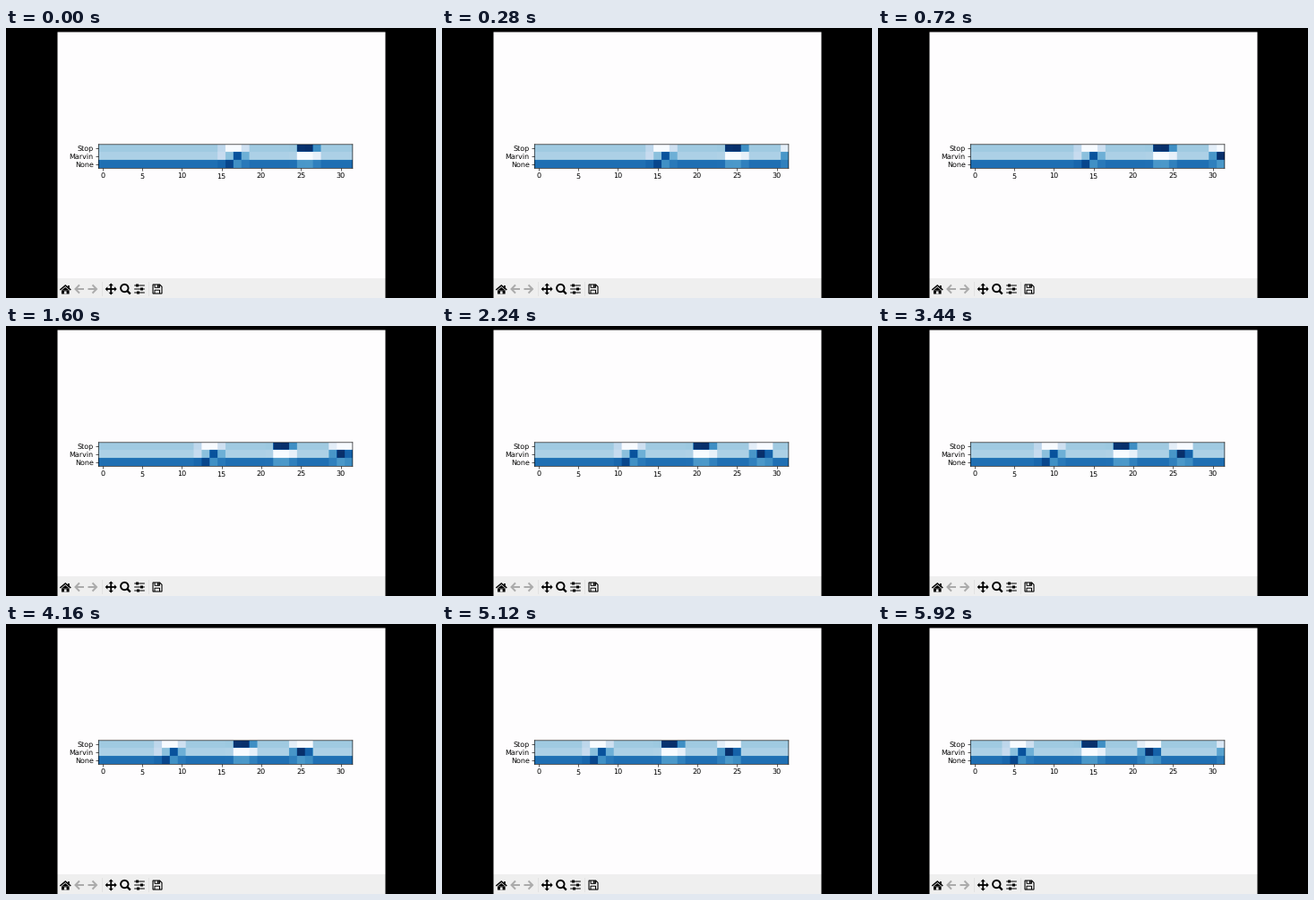
Animation of 480 by 301 pixels, one loop 6000 ms. Source, as a matplotlib script:

```python
import numpy as np
import matplotlib.pyplot as plt
from matplotlib.animation import FuncAnimation
from matplotlib.patches import Circle, Polygon, Rectangle

# Unsnapped shapes and unhinted text look like a scaled-down window
plt.rcParams.update({"path.snap": False, "text.hinting": "none"})

W, H, DPI = 480, 301, 100
STEP, LOOP = 40, 6000
COLS, LABELS = 32, ["Stop", "Marvin", "None"]
STOP, MARVIN, NONE = range(3)

# Scrolling: a steady beat with one stall (ms)
START, BEAT = 200, 500
STALL, STALL_AFTER = 460, 7


def scroll(t):
    """Cells scrolled by time t."""
    before = min((t - START) // BEAT + 1, STALL_AFTER)
    after = (t - START - STALL) // BEAT + 1
    return max(0, before, after)


def hear(scores, word, centre, width, gain=1):
    """Raise the score of one word around a column and damp the others."""
    cols = np.arange(scores.shape[1])
    pulse = gain * np.exp(-((cols - centre) / width) ** 6)
    for row, damping in enumerate((1.8, 1.8, 0.21)):
        if row == word:
            scores[row] += (1 - scores[row]) * pulse
        else:
            scores[row] *= 1 - np.minimum(1, damping * pulse)


stream = np.outer([0.37, 0.33, 0.755], np.ones(COLS + scroll(LOOP)))
hear(stream, NONE, 15.95, 0.85)
hear(stream, MARVIN, 16.95, 1.02, 0.81)
hear(stream, STOP, 25.7, 1.33)
hear(stream, MARVIN, 33.08, 1.1)
hear(stream, MARVIN, 43.12, 1.1)

# Window: a 640 x 480 canvas above a toolbar
X0, Y0, WIDTH = 57.5, 4.5, 366
SCALE = WIDTH / 640
HEIGHT = 480 * SCALE
BAR_TOP, BAR_Y, BAR = Y0 + HEIGHT, 291, "#efefef"

fig = plt.figure(figsize=(W / DPI, H / DPI), dpi=DPI, facecolor="black")
stage = fig.add_axes([0, 0, 1, 1])
stage.set(xlim=(0, W), ylim=(H, 0))
stage.axis("off")


def box(x, y, w, h, color="black"):
    stage.add_patch(Rectangle((x, y), w, h, fc=color, lw=0))


def line(points, width, color="black"):
    x, y = zip(*points)
    stage.plot(x, y, color=color, lw=width * 72 / DPI,
               solid_capstyle="butt", solid_joinstyle="miter")


def home(x, y):
    line([(x - 6, y + 1), (x, y - 4), (x + 6, y + 1)], 1.5)
    box(x + 2.8, y - 4, 1.7, 3.5)
    stage.add_patch(Polygon([(x - 4.3, y + 1.5), (x, y - 2), (x + 4.3, y + 1.5)],
                            fc="black", lw=0))
    box(x - 4.3, y + 1.5, 8.6, 4)
    box(x - 1.3, y + 2.4, 2.6, 3.1, BAR)


def arrow(x, y, d):
    grey = "#ababab"
    line([(x - d * 5, y), (x + d * 4, y)], 2, grey)
    line([(x, y - 4.6), (x + d * 4.5, y), (x, y + 4.6)], 2, grey)


def move(x, y):
    for dx, dy in [(1, 0), (-1, 0), (0, 1), (0, -1)]:
        line([(x, y), (x + 5 * dx, y + 5 * dy)], 1.8)
        bx, by = x + 3.8 * dx, y + 3.8 * dy
        head = [(x + 6.5 * dx, y + 6.5 * dy),
                (bx + 2.7 * dy, by + 2.7 * dx),
                (bx - 2.7 * dy, by - 2.7 * dx)]
        stage.add_patch(Polygon(head, fc="black", lw=0))


def zoom(x, y):
    stage.add_patch(Circle((x - 1, y - 1), 4.2, fill=False, lw=1.35))
    line([(x + 2, y + 2), (x + 5.5, y + 5.5)], 2.3)


def sliders(x, y):
    for dy, knob in [(-4, -2.5), (0, 2.5), (4, -1.5)]:
        line([(x - 5.8, y + dy), (x + 5.8, y + dy)], 1)
        box(x + knob - 1.5, y + dy - 1.5, 3, 3)


def save(x, y):
    line([(x - 5, y), (x - 5, y - 5), (x + 2.6, y - 5), (x + 5, y - 2.6),
          (x + 5, y + 5), (x - 5, y + 5), (x - 5, y)], 1.1)
    for edge, inner in [(-5, -1.7), (5, 1.2)]:
        line([(x - 3, y + edge), (x - 3, y + inner),
              (x + 2.5, y + inner), (x + 2.5, y + edge)], 1)
    box(x, y - 5, 1.6, 3)


box(X0, Y0, WIDTH, HEIGHT, "#fefdfe")
box(X0, BAR_TOP, WIDTH, H - BAR_TOP, BAR)
home(66.3, BAR_Y)
arrow(82, BAR_Y, -1)
arrow(96.5, BAR_Y, 1)
move(117.2, BAR_Y)
zoom(133.3, BAR_Y)
sliders(149, BAR_Y)
save(169, BAR_Y)
for x in (107.5, 159.5):
    line([(x, 283), (x, 299)], 1, "#e2e2e2")

# Heat strip of square cells in the default subplot position
strip_w = 0.775 * WIDTH
strip_h = strip_w * len(LABELS) / COLS
left = X0 + 0.125 * WIDTH
bottom = Y0 + 0.505 * HEIGHT + strip_h / 2
ax = fig.add_axes([left / W, 1 - bottom / H, strip_w / W, strip_h / H])


def cells(t):
    """Visible scores, subdivided so that cell edges come out soft."""
    first = scroll(t)
    return np.kron(stream[:, first:first + COLS], np.ones((8, 8)))


strip = ax.imshow(cells(0), cmap="Blues", vmin=0, vmax=1, aspect="auto",
                  interpolation="bilinear",
                  extent=(-0.5, COLS - 0.5, len(LABELS) - 0.5, -0.5))
ax.set_xticks(range(0, COLS, 5))
ax.set_yticks(range(len(LABELS)), LABELS)
ax.tick_params(labelsize=10 * SCALE, length=3.5 * SCALE,
               pad=3.5 * SCALE, width=0.8 * SCALE)
for spine in ax.spines.values():
    spine.set_linewidth(0.8 * SCALE)


def update(i):
    strip.set_data(cells(i * STEP))
    return [strip]


anim = FuncAnimation(fig, update, frames=LOOP // STEP, interval=STEP,
                     repeat=True, repeat_delay=0)
plt.show()
```
